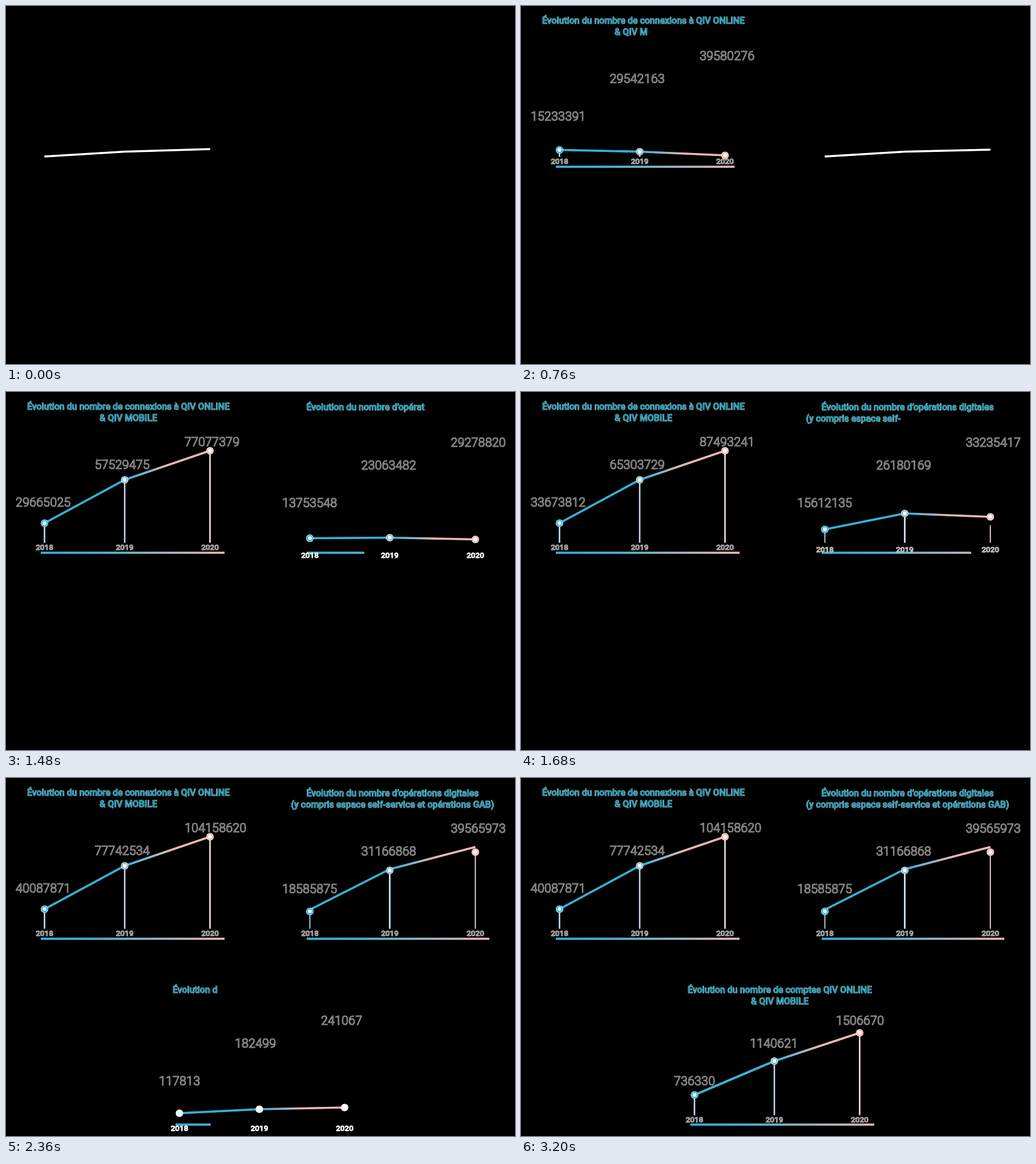
An HTML page with a canvas for the animation above (4.04 s loop, 892 by 628 pixels).

```html
<!DOCTYPE html>
<html lang="fr">
<head>
<meta charset="utf-8">
<title>Évolution</title>
<style>
html, body { margin: 0; width: 100%; height: 100%; overflow: hidden; background: #000; }
canvas { display: block; }
</style>
</head>
<body>
<canvas id="stage" width="892" height="628"></canvas>
<script>
const ctx = document.getElementById('stage').getContext('2d');
const LOOP = 4040, STEP = 40;
const FONT = 'Roboto, "Open Sans", sans-serif';
const CYAN = [25, 178, 226], MIST = [128, 182, 206], PINK = [242, 178, 170];
const DOTS = [CYAN, MIST, PINK];
const STEMS = ['#b9e4ef', '#bcdde8', '#fbe3de'];
const YEARS = ['2018', '2019', '2020'];

// start / mid / end: heights of the three points above the floor
const charts = [
  {
    title: ['Évolution du nombre de connexions à QIV ONLINE', '& QIV MOBILE'],
    center: 214.5, titleY: 31,
    x: [67.5, 208, 357.5], floor: 264,
    start: [0, 8.5, 13], mid: [22, 54, 46], end: [34, 110, 161], lift: [0, 0, 0],
    stemW: [2.6, 2.6, 2.6],
    values: [40087871, 77742534, 104158620], numX: [17, 155.5, 313], numY: [200.5, 134.5, 94.5],
    rule: [61, 383, 282], yearY: 277,
    show: 0, dotsIn: 120, lineTint: 160, dotTint: 180, type: 300, rise: 880, count: [0, 2000]
  },
  {
    title: ['Évolution du nombre d’opérations digitales', '(y compris espace self-service et opérations GAB)'],
    center: 677.5, titleY: 32,
    x: [532.5, 672.5, 822.5], floor: 264,
    start: [0, 8.5, 12], mid: [23, 51, 45], end: [30, 102, 134], lift: [3, 2, 9],
    stemW: [1.8, 3, 1.8],
    values: [18585875, 31166868, 39565973], numX: [484, 622.5, 779.5], numY: [202, 136, 96],
    rule: [527, 847, 282], yearY: 277,
    show: 680, dotsIn: 1120, lineTint: 1190, dotTint: 1190, type: 1323, rise: 1680, count: [0, 2000]
  },
  {
    title: ['Évolution du nombre de comptes QIV ONLINE', '& QIV MOBILE'],
    center: 453.5, titleY: 377,
    x: [304, 444, 593.5], floor: 591,
    start: [3, 10, 13], mid: [22, 53.5, 46], end: [35, 94.5, 144], lift: [0, 0, 0],
    stemW: [2.6, 2.6, 2.6],
    values: [736330, 1140621, 1506670], numX: [268, 401, 552], numY: [538.5, 472.5, 432.5],
    rule: [297, 619, 608], yearY: 604,
    show: 2200, dotsIn: 2240, lineTint: 2200, dotTint: 2345, type: 2256, rise: 2720, count: [2200, 3200]
  }
];
const DIP = [11.5, 8.5, 2];

const ramp = (t, a, b) => Math.min(1, Math.max(0, (t - a) / (b - a)));
const swing = p => (1 - Math.cos(Math.PI * p)) / 2;
const mix = (a, b, p) => a + (b - a) * p;
const rgb = c => `rgb(${c.map(Math.round).join(',')})`;
const fromWhite = (c, p) => rgb(c.map(v => mix(255, v, p)));

function text(str, x, y, font, fill, halo, width) {
  ctx.font = font;
  ctx.lineJoin = 'round';
  ctx.lineWidth = width;
  ctx.strokeStyle = halo;
  ctx.strokeText(str, x, y);
  ctx.fillStyle = fill;
  ctx.fillText(str, x, y);
}

function gradient(x0, x1, stops, p) {
  const g = ctx.createLinearGradient(x0, 0, x1, 0);
  stops.forEach(([at, c]) => g.addColorStop(at, fromWhite(c, p)));
  return g;
}

function path(points, style, width) {
  ctx.beginPath();
  points.forEach(([x, y]) => ctx.lineTo(x, y));
  ctx.strokeStyle = style;
  ctx.lineWidth = width;
  ctx.stroke();
}

// coloured stroke with a paler rim
function rimmed(points, x0, x1, stops, tint) {
  path(points, gradient(x0, x1, stops, tint * 0.55), 3.6);
  path(points, gradient(x0, x1, stops, tint), 2.4);
}

function disc(x, y, r, style) {
  ctx.beginPath();
  ctx.arc(x, y, r, 0, Math.PI * 2);
  ctx.fillStyle = style;
  ctx.fill();
}

function heights(c, t) {
  const dip = swing(ramp(t, c.rise - 320, c.rise - 120));
  const climb = ramp(t, c.rise - 120, c.rise);
  const top = Math.sin(ramp(t, c.rise, c.rise + 260) * Math.PI / 2);
  const h = c.end.map((end, i) => {
    if (top > 0) return mix(c.mid[i], end, top);
    if (climb > 0) return mix(DIP[i], c.mid[i], climb);
    return mix(c.start[i], DIP[i], dip);
  });
  return { h, top };
}

function drawTitle(c, t) {
  const total = c.title[0].length + c.title[1].length;
  let left = Math.floor(total * ramp(t, c.type, c.type + 500) + 0.1);
  const font = `500 15.9px ${FONT}`;
  ctx.font = font;
  c.title.forEach((line, i) => {
    const x = c.center - ctx.measureText(line).width / 2;
    text(line.slice(0, Math.max(0, left)), x, c.titleY + 20 * i, font, '#1c98b5', '#a4dae5', 1);
    left -= line.length;
  });
}

function drawLabels(c, t) {
  const done = ramp(t, ...c.count);
  ctx.globalAlpha = ramp(t, c.type - 20, c.type + 80);
  c.values.forEach((v, i) => {
    text(String(Math.round(v * done)), c.numX[i], c.numY[i],
      `300 21.7px ${FONT}`, '#666', '#c0c0c0', 1.2);
  });

  const slide = swing(ramp(t, c.type + 100, c.type + 490));
  ctx.globalAlpha = ramp(t, c.type + 20, c.type + 100);
  ctx.textAlign = 'center';
  YEARS.forEach((year, i) => {
    text(year, c.x[i], c.yearY + 15 * (1 - slide),
      `500 13.5px ${FONT}`, fromWhite([145, 145, 145], slide), fromWhite([225, 225, 225], slide), 1);
  });
  ctx.textAlign = 'left';
  ctx.globalAlpha = 1;
}

function drawChart(c, t) {
  if (t < c.show) return;
  const { h, top } = heights(c, t);
  const [x0, x1, ruleY] = c.rule;

  drawTitle(c, t);

  const grown = swing(ramp(t, c.type - 66, c.type + 522));
  if (grown > 0) {
    rimmed([[x0, ruleY], [mix(x0, x1, grown), ruleY]],
      x0, x1, [[0, CYAN], [0.3, [50, 178, 216]], [1, PINK]], 1);
  }

  ctx.globalAlpha = ramp(t, c.rise - 200, c.rise - 140);
  h.forEach((v, i) => {
    const tall = i === 2 ? v * (0.5 + 0.5 * v / c.end[2]) : v;
    const y = Math.max(c.floor - tall, c.floor - v + 6);
    if (y < c.floor) path([[c.x[i], y], [c.x[i], c.floor + 0.5]], STEMS[i], c.stemW[i]);
  });
  ctx.globalAlpha = 1;

  const lineTint = ramp(t, c.lineTint, c.lineTint + 160);
  rimmed(h.map((v, i) => [c.x[i], c.floor - v - c.lift[i] * top]),
    c.x[0], c.x[2], [[0, CYAN], [0.5, CYAN], [0.76, PINK], [1, PINK]], lineTint);

  const dotTint = ramp(t, c.dotTint, c.dotTint + 160);
  ctx.globalAlpha = ramp(t, c.dotsIn, c.dotsIn + 80);
  h.forEach((v, i) => {
    const y = c.floor - v;
    disc(c.x[i], y, 6.6, fromWhite(DOTS[i], dotTint * 0.3));
    disc(c.x[i], y, 5.5, fromWhite(DOTS[i], dotTint));
    disc(c.x[i], y, 3.4, '#fff');
  });
  ctx.globalAlpha = 1;

  drawLabels(c, t);
}

function frame(now) {
  let t = Math.floor((now % LOOP) / STEP) * STEP;
  if (t < 120) t = 0;
  ctx.fillStyle = '#000';
  ctx.fillRect(0, 0, 892, 628);
  charts.forEach(c => drawChart(c, t));
}

const begin = performance.now();
function tick() {
  frame(performance.now() - begin);
  requestAnimationFrame(tick);
}
tick();
</script>
</body>
</html>
```
